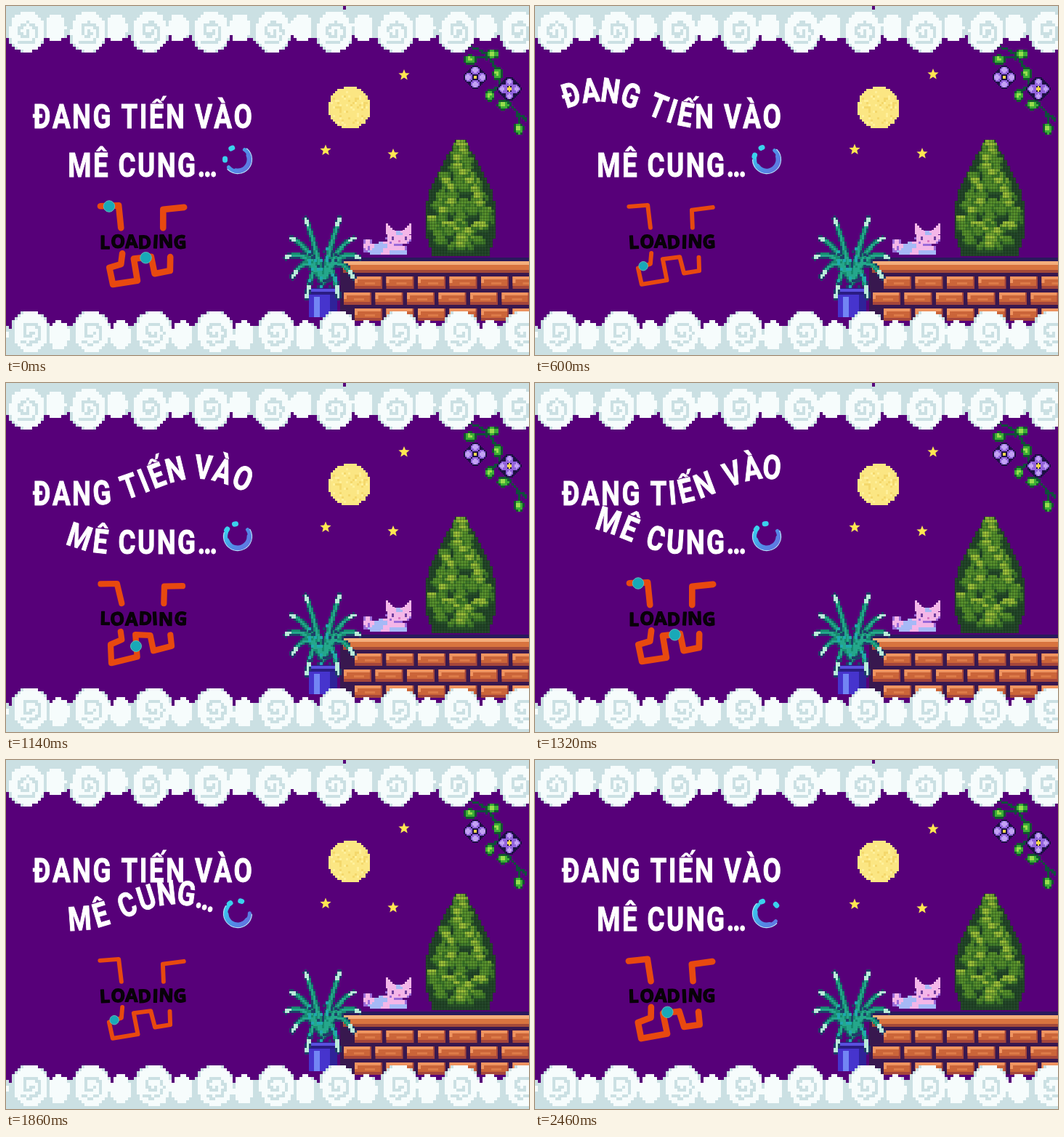
Animation, 720 px wide and 480 px high, one loop 2.52 s. Source, as an HTML page with a canvas:

```html
<!DOCTYPE html>
<html lang="vi">
<head>
<meta charset="utf-8">
<title>Loading</title>
<style>
html, body { margin: 0; width: 100%; height: 100%; overflow: hidden; background: #570079; }
canvas { display: block; }
</style>
</head>
<body>
<canvas id="stage" width="720" height="480"></canvas>
<script>
const LOOP = 2520, STEP = 60, MAZE_LOOP = 1260, TAU = Math.PI * 2;
const stage = document.getElementById('stage').getContext('2d');
const scenery = document.createElement('canvas');
scenery.width = 720;
scenery.height = 480;
let g = scenery.getContext('2d');

let seed = 11;
const rnd = () => (seed = seed * 16807 % 2147483647) / 2147483647;

// ---- pixel-art helpers ----
function rect(x, y, w, h, color) {
  g.fillStyle = color;
  g.fillRect(x, y, w, h);
}
function cell(x, y, color, s = 4) {
  rect(Math.floor(x / s) * s, Math.floor(y / s) * s, s, s, color);
}
function blob(cx, cy, rx, ry, color, s = 4) {
  for (let y = Math.floor((cy - ry) / s) * s; y < cy + ry; y += s)
    for (let x = Math.floor((cx - rx) / s) * s; x < cx + rx; x += s)
      if (((x + s / 2 - cx) / rx) ** 2 + ((y + s / 2 - cy) / ry) ** 2 <= 1) rect(x, y, s, s, color);
}
function curve(x0, y0, cx, cy, x1, y1, draw) {
  for (let t = 0; t <= 1; t += 0.02) {
    const u = 1 - t;
    draw(u * u * x0 + 2 * u * t * cx + t * t * x1, u * u * y0 + 2 * u * t * cy + t * t * y1, t);
  }
}

// ---- static scenery ----
function clouds(x0, y, edge, dir) {
  const shade = '#cbe0e3', white = '#f6fcfc';
  rect(0, edge, 720, 36, shade);
  for (let x = x0 - 84.7; x < 800; x += 84.7) {
    blob(x + 44, y - dir * 8, 20, 19, shade);
    blob(x + 40, y - dir * 5, 14, 20, white);
    blob(x, y, 27, 29, shade);
    blob(x + 1, y, 24, 28, white);
    for (let a = 0; a < 8.5; a += 0.1) {
      const r = 3 + a * 1.7;
      cell(x + r * Math.cos(a), y + r * Math.sin(a), shade);
    }
  }
}

function moon() {
  blob(473, 140, 29, 29, '#fbe683', 3);
  for (let i = 0; i < 70; i++) {
    const a = rnd() * TAU, r = 26 * Math.sqrt(rnd());
    cell(473 + r * Math.cos(a), 140 + r * Math.sin(a), i % 2 ? '#f4d86c' : '#fff09b', 3);
  }
}

function tree() {
  const half = y => Math.round((6 + 43 * Math.sin(2.35 * (y - 184) / 160)) / 4) * 4;
  for (let y = 184; y < 344; y += 4) rect(626 - half(y), y, half(y) * 2, 4, '#24482b');
  for (let y = 190; y < 336; y += 10) {
    const w = Math.max(4, half(y) - 9);
    for (let i = 0; i < 2 + w / 9; i++) {
      const side = rnd() * 2 - 1, x = 626 + side * w, cy = y + 4 * Math.abs(side);
      const lit = rnd() < 0.55;
      blob(x, cy + 4, 9, 6, '#2a552c');
      blob(x, cy, 9, 6, '#43802c');
      blob(x - 1, cy - 2, 7, 5, lit ? '#7cae34' : '#5a962e');
      if (lit) blob(x - 2, cy - 3, 5, 3, '#a6ca3c');
    }
  }
  g.strokeStyle = 'rgba(20,45,20,.3)';
  g.lineWidth = 0.7;
  for (let y = 184; y < 344; y += 4)
    for (let x = 626 - half(y); x < 626 + half(y); x += 4) g.strokeRect(x, y, 4, 4);
}

function wall() {
  rect(460, 346, 260, 86, '#38184f');
  rect(460, 346, 260, 5, '#29195c');
  rect(464, 351, 256, 12, '#d8743f');
  rect(464, 351, 256, 5, '#f4ae7c');
  rect(464, 363, 256, 4, '#a44a39');
  for (let row = 0; row < 3; row++) {
    const y = 372 + row * 22;
    for (let x = row % 2 ? 465 : 480; x < 720; x += 43.5) {
      rect(x, y, 38, 17, '#a5463b');
      rect(x, y, 36, 13, '#cb6539');
      rect(x, y, 36, 4, '#ef9460');
      rect(x, y + 4, 4, 5, '#ef9460');
      rect(x + 14, y + 8, 14, 3, '#dc7a48');
    }
  }
}

function cat() {
  const edge = '#9a6ad8', pink = '#f4b6e8', blue = '#a6b9f6';
  blob(498, 330, 7, 10, edge, 3);
  blob(498, 329, 5, 7, pink, 3);
  blob(525, 334, 27, 9, edge, 3);
  blob(525, 333, 25, 8, pink, 3);
  blob(516, 330, 8, 5, blue, 3);
  blob(508, 338, 10, 4, blue, 3);
  for (let k = 0; k < 5; k++) {
    rect(523, 299 + k * 3, 3 + k * 3, 3, pink);
    rect(555 - k * 3, 299 + k * 3, 3 + k * 3, 3, pink);
  }
  blob(541, 319, 18, 10, edge, 3);
  blob(541, 318, 17, 10, pink, 3);
  blob(541, 313, 5, 3, blue, 3);
  rect(531, 317, 3, 5, '#70409f');
  rect(549, 317, 3, 5, '#70409f');
  rect(540, 322, 3, 3, '#d777c5');
  blob(540, 339, 12, 4, blue, 3);
}

function plant() {
  rect(412, 388, 48, 9, '#2a1c83');
  rect(416, 389, 40, 4, '#5a50df');
  rect(417, 397, 39, 31, '#4634cd');
  rect(424, 400, 8, 28, '#7285f4');
  rect(446, 397, 10, 31, '#2f2299');
  ['#1f3f69', '#178a6f', '#24a78b'].forEach((color, layer) => {
    for (let i = 0; i < 10; i++) {
      const side = i % 2 ? 1 : -1, k = i >> 1;
      const dx = side * (24 + 28 * Math.sin(k * 0.8)), tip = 291 + 28 * k;
      curve(436, 380, 436 + dx * 0.45, tip + 34 - 26 * k, 436 + dx, tip, (x, y, t) => {
        const r = (6 - layer * 2) * (1 - t * 0.4);
        blob(x, y, r, r, layer && t > 0.85 ? '#b9ecd9' : color, 3);
      });
    }
  });
  for (let i = 0; i < 44; i++) cell(416 + rnd() * 40, 335 + rnd() * 56, i % 2 ? '#1fa9ae' : '#1f3f69');
}

function vine() {
  const stem = (x, y) => cell(x, y, '#0f4f3b', 3), ink = '#1d1045';
  curve(638, 56, 668, 62, 676, 94, stem);
  curve(676, 94, 688, 138, 718, 158, stem);
  curve(662, 72, 650, 66, 640, 74, stem);
  curve(682, 112, 670, 112, 666, 124, stem);
  curve(702, 146, 708, 156, 706, 168, stem);
  [[670, 66], [677, 93], [639, 74], [666, 123], [685, 136], [706, 169]].forEach(([x, y], i) => {
    const rx = i % 2 ? 6 : 8, ry = 14 - rx;
    blob(x, y, rx + 1, ry + 1, '#12562f', 3);
    blob(x, y, rx - 1, ry - 1, '#3dae36', 3);
    blob(x - 1, y - 1, 3, 3, '#98dd4e', 3);
  });
  for (const [x, y] of [[646, 98], [693, 114]]) {
    const petals = (d, r, color) => {
      for (let a = 0; a < 6; a += TAU / 4) blob(x + d * Math.cos(a), y + d * Math.sin(a), r, r, color, 2);
    };
    blob(x, y, 14, 14, ink, 2);
    petals(9, 7.5, ink);
    petals(8.5, 6, '#9263dc');
    petals(10, 3.5, '#c3a2f5');
    blob(x, y, 4, 4, ink, 2);
    blob(x, y, 3, 3, '#f6d84c', 2);
  }
}

rect(0, 0, 720, 480, '#570079');
vine();
moon();
tree();
wall();
cat();
plant();
clouds(28, 35, 0, 1);
clouds(33, 448, 444, -1);
rect(464, 0, 4, 5, '#570079');
g = stage;

// ---- moving parts ----
// Calls draw(letter, x) for each letter of a line centred on cx.
function spread(text, cx, gap, scale, draw) {
  const widths = [...text].map(c => g.measureText(c).width * scale + gap);
  let x = cx - (widths.reduce((a, b) => a + b) - gap) / 2;
  const left = x;
  [...text].forEach((c, i) => {
    draw(c, x + (widths[i] - gap) / 2, left, i);
    x += widths[i];
  });
}

// A raised-cosine bump runs to the right and the letters ride on it.
function waveLine(text, y, time) {
  const reach = 140, height = 36;
  g.font = 'bold 46px Roboto, sans-serif';
  g.textAlign = 'center';
  g.fillStyle = g.strokeStyle = '#fff';
  g.lineWidth = 1;
  g.lineJoin = 'miter';
  spread(text, 188, 2.4, 0.8, (c, x, left) => {
    const peak = left - reach + 0.32 * time;
    const a = Math.max(-1, Math.min(1, (x - peak) / reach)) * Math.PI;
    g.save();
    g.translate(x, y - height * (1 + Math.cos(a)) / 2);
    g.rotate(Math.atan(height * Math.PI / 2 / reach * Math.sin(a)));
    g.scale(0.8, 1);
    g.fillText(c, 0, 16.5);
    g.strokeText(c, 0, 16.5);
    g.restore();
  });
}

function smile(t) {
  const k = t / LOOP, rad = TAU / 360;
  const from = (100 * k * k - 55) * rad, to = (140 + 88 * Math.sqrt(k)) * rad;
  const arc = (r, width, color, a, b) => {
    g.beginPath();
    g.arc(319, 211, r, a, b);
    g.lineWidth = width;
    g.strokeStyle = color;
    g.stroke();
  };
  const shade = g.createLinearGradient(300, 200, 334, 228);
  shade.addColorStop(0, '#35d5ee');
  shade.addColorStop(0.6, '#5289e6');
  shade.addColorStop(1, '#6473df');
  g.lineCap = 'round';
  arc(18.4, 3.5, '#b4e2f8', from + 0.12, to - 0.1);
  arc(16.4, 5, shade, from, to);
  arc(15.8, 6.5, shade, from + 0.6, to - 0.7);
  for (const eye of [180 + 70 * k, 242 + 80 * k * k]) arc(17.5, 7, '#3bd2ed', eye * rad - 0.06, eye * rad + 0.06);
}

function star(x, y) {
  g.beginPath();
  for (let i = 0; i < 10; i++) {
    const a = i * TAU / 10 - TAU / 4, r = i % 2 ? 3.5 : 8;
    g.lineTo(x + r * Math.cos(a), y + r * Math.sin(a));
  }
  g.fillStyle = '#ffe751';
  g.fill();
}

const tracks = [
  [[130, 276], [154, 275], [159, 304]],
  [[159, 341], [159, 354], [143, 360], [146, 384], [181, 377], [177, 347], [199, 346], [204, 368], [227, 363], [226, 346]],
  [[217, 304], [217, 280], [244, 278]]
];
const route = tracks.flat();

// Point at a distance along the route, or nothing past its end.
function along(distance) {
  for (let i = 1; i < route.length; i++) {
    const [x, y] = route[i - 1], dx = route[i][0] - x, dy = route[i][1] - y;
    const k = distance / Math.hypot(dx, dy);
    if (k <= 1) return [x + dx * k, y + dy * k];
    distance -= Math.hypot(dx, dy);
  }
}

function maze(t) {
  const n = Math.floor(t % MAZE_LOOP / 120);
  const wobble = i => 1.2 * Math.sin(n * 2.4 + i * 1.9);
  const width = 7.3 - 1.4 * Math.cos(TAU * (n - 5) / 11);
  g.lineCap = g.lineJoin = 'round';
  g.strokeStyle = '#e8490f';
  g.lineWidth = width;
  tracks.forEach((points, j) => {
    g.beginPath();
    points.forEach(([x, y], i) => g.lineTo(x + wobble(i + j), y + wobble(i + j + 2)));
    g.stroke();
  });
  for (const lap of [0, 1]) {
    const spot = along(12 + 0.17 * (n * 120 + lap * MAZE_LOOP));
    if (!spot || spot[1] > 306 && spot[1] < 340) continue;
    g.beginPath();
    g.arc(...spot, 3 + width * 0.55, 0, TAU);
    g.fillStyle = '#18a9b8';
    g.fill();
    g.lineWidth = 1;
    g.strokeStyle = '#62b9b4';
    g.stroke();
  }
  g.font = 'bold 25px "Open Sans", sans-serif';
  spread('LOADING', 189, 0.6, 1, (c, x, left, i) => {
    g.save();
    g.translate(x + wobble(i) * 0.5, 324 + wobble(i + 1) * 0.5);
    g.rotate(0.06 * Math.sin(n + i * 2));
    g.fillStyle = g.strokeStyle = '#080208';
    g.lineWidth = 1.4;
    g.strokeText(c, 0, 9);
    g.fillText(c, 0, 9);
    g.restore();
  });
}

function render(now) {
  const t = Math.floor(now % LOOP / STEP) * STEP;
  g.drawImage(scenery, 0, 0);
  const lift = (1 - Math.cos(TAU * t / MAZE_LOOP)) / 2;
  for (const [x, y] of [[548, 95], [440, 198.5], [533, 204]]) star(x, y - lift);
  waveLine('ĐANG TIẾN VÀO', 151, t);
  waveLine('MÊ CUNG…', 218, t - 960);
  smile(t);
  maze(t);
}

let began;
function tick(now) {
  began ??= now;
  render(now - began);
  requestAnimationFrame(tick);
}
requestAnimationFrame(tick);
</script>
</body>
</html>
```
